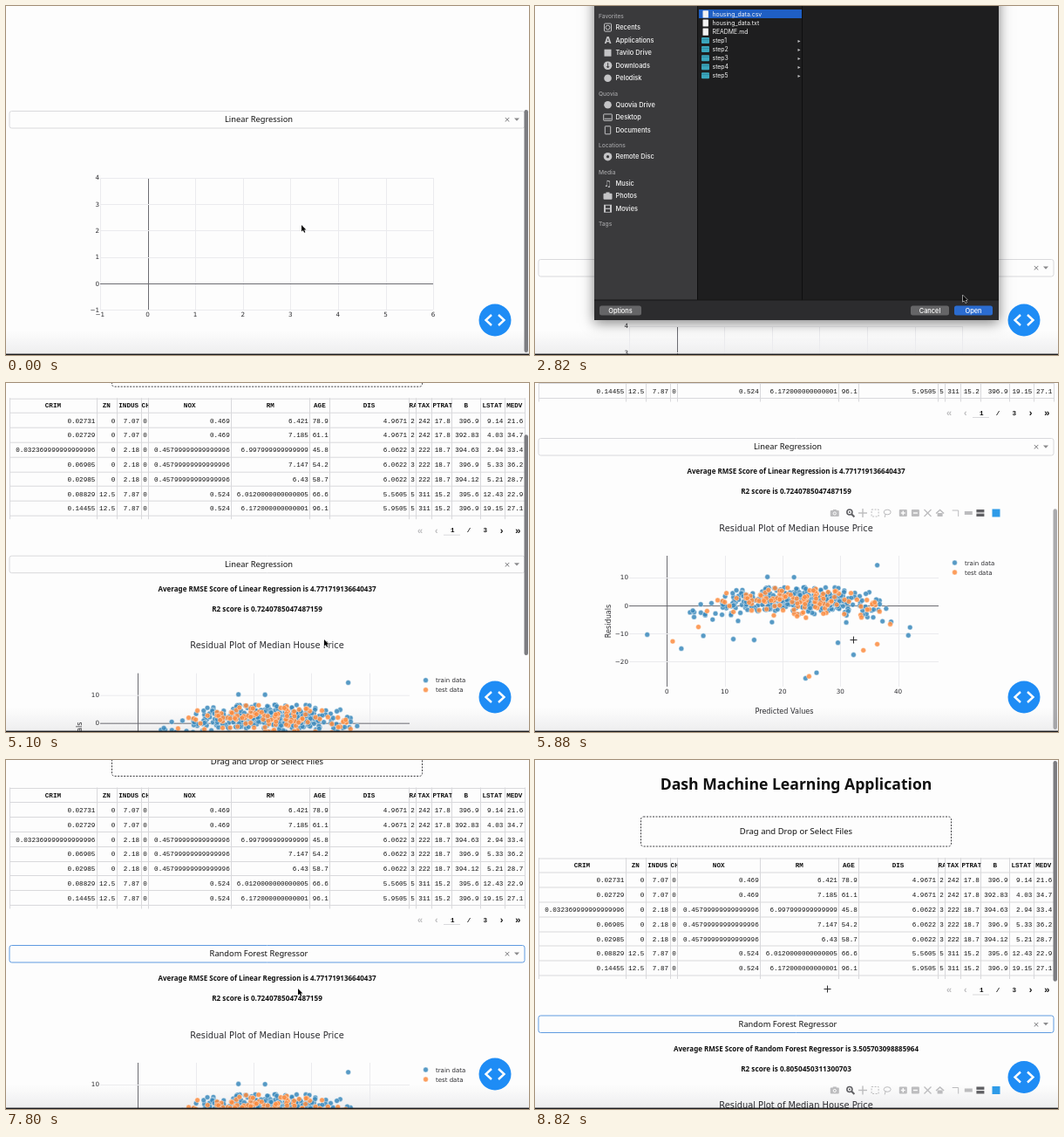
An HTML page with a canvas that plays this animation: 600x400 px, repeating every 8.88 s.

```html
<!DOCTYPE html>
<html lang="en">
<head>
<meta charset="utf-8">
<title>Machine learning dashboard</title>
<style>
html, body { margin: 0; width: 100%; height: 100%; overflow: hidden; background: #fdfdfd; }
canvas { display: block; }
</style>
</head>
<body>
<canvas id="stage" width="600" height="400"></canvas>
<script>
const ctx = document.getElementById('stage').getContext('2d');
const LOOP = 8880, STEP = 60;
const PAPER = '#fdfdfd', INK = '#101010', SOFT = '#2c2c30', RULE = '#d9d9dc', GREY = '#bcbcbe', DARK = '#606064';
const BLUE = '#1e8cf5', TRAIN = '#3a88bb', TEST = '#fb8c40';
const HAND = '"Comic Sans MS", "Noto Sans", sans-serif';
const CHART = '"DejaVu Sans", sans-serif';
const MONO = '"Liberation Mono", monospace';
const UI = 'Inter, sans-serif';

// Times of the events, in ms
const T = { sheetIn: 870, pick: 1740, open: 3240, hover: 3600, table: 4320, plot: 4440,
  menu: 7140, choose: 7680, result: 8040, leave: 8150 };

// Moves: start, end, then the value or point arrived at
const scrolls = [[0, 0, 170], [60, 720, 0], [4680, 5640, 227], [6420, 6960, 78], [7860, 8220, 227], [8400, 8810, -2.5]];
const pointer = [[0, 0, 339, 251], [60, 660, 306, 82], [900, 1080, 307, 115], [1140, 1700, 232, 8],
  [2300, 2900, 504, 348], [4380, 4680, 365, 294], [5940, 6420, 335, 222], [7140, 7500, 335, 262]];

const clamp = u => Math.max(0, Math.min(1, u));
const ease = (t, from, to) => { const u = clamp((t - from) / (to - from)); return u * u * (3 - 2 * u); };
const follow = (moves, t, i = 2) => moves.slice(1).reduce(
  (v, m) => t > m[0] ? v + (m[i] - v) * ease(t, m[0], m[1]) : v, moves[0][i]);

function text(s, x, y, font, color = INK, align = 'center') {
  ctx.font = font;
  ctx.fillStyle = color;
  ctx.textAlign = align;
  ctx.fillText(s, x, y + parseFloat(font.match(/[\d.]+px/)[0]) * 0.36);
}

function rect(x, y, w, h, color) {
  ctx.fillStyle = color;
  ctx.fillRect(x, y, w, h);
}

function paint(fill, stroke, width = 1) {
  if (fill) { ctx.fillStyle = fill; ctx.fill(); }
  if (stroke) { ctx.strokeStyle = stroke; ctx.lineWidth = width; ctx.stroke(); }
}

function box(x, y, w, h, r, fill, stroke) {
  ctx.beginPath();
  ctx.roundRect(x, y, w, h, r);
  paint(fill, stroke);
}

function disc(x, y, r, fill, stroke, width) {
  ctx.beginPath();
  ctx.arc(x, y, r, 0, 7);
  paint(fill, stroke, width);
}

function line(points, color, width) {
  ctx.beginPath();
  points.forEach(([x, y]) => ctx.lineTo(x, y));
  paint(null, color, width);
}

function dashedBox(x, y, w, h, r, color) {
  ctx.setLineDash([2, 1.5]);
  box(x, y, w, h, r, null, color);
  ctx.setLineDash([]);
}

// Data table; a column is as wide as its longest value, which may be on a later page
const heads = 'CRIM ZN INDUS CHAS NOX RM AGE DIS RAD TAX PTRATIO B LSTAT MEDV'.split(' ');
const laterValues = { INDUS: '18.1'.length + 1, DIS: '5.5605000000000002'.length };
const rows = `0.02731 0 7.07 0 0.469 6.421 78.9 4.9671 2 242 17.8 396.9 9.14 21.6
0.02729 0 7.07 0 0.469 7.185 61.1 4.9671 2 242 17.8 392.83 4.03 34.7
0.032369999999999996 0 2.18 0 0.45799999999999996 6.997999999999999 45.8 6.0622 3 222 18.7 394.63 2.94 33.4
0.06905 0 2.18 0 0.45799999999999996 7.147 54.2 6.0622 3 222 18.7 396.9 5.33 36.2
0.02985 0 2.18 0 0.45799999999999996 6.43 58.7 6.0622 3 222 18.7 394.12 5.21 28.7
0.08829 12.5 7.87 0 0.524 6.0120000000000005 66.6 5.5605 5 311 15.2 395.6 12.43 22.9
0.14455 12.5 7.87 0 0.524 6.172000000000001 96.1 5.9505 5 311 15.2 396.9 19.15 27.1`
  .split('\n').map(r => r.split(' '));
const edges = [4];
heads.forEach((h, c) => {
  const longest = Math.max(laterValues[h] || 0, ...rows.map(r => r[c].length));
  edges.push(edges[c] + 4.8 * longest + 3.8);
});

function cell(s, c, y, head) {
  const left = edges[c], right = edges[c + 1], font = `${head ? 'bold ' : ''}7.6px ${MONO}`;
  ctx.save();
  ctx.beginPath();
  ctx.rect(left, y - 9, right - left, 18);
  ctx.clip();
  ctx.font = font;
  if (!head) text(s, right - 1.5, y, font, INK, 'right');
  else if (ctx.measureText(s).width < right - left) text(s, (left + right) / 2, y, font);
  else text(s, left + 1, y, font, INK, 'left');
  ctx.restore();
}

function drawTable() {
  const pitch = 16.8, top = 109.5;
  for (let i = 0; i < 9; i++) rect(4, Math.round(top + i * pitch), 591, 1, RULE);
  edges.forEach(x => rect(Math.round(x), top, 1, 139, RULE));
  heads.forEach((h, c) => cell(h, c, 118, true));
  rows.forEach((r, i) => r.forEach((v, c) => cell(v, c, 135.2 + i * pitch)));
  [...'«‹1/3›»'].forEach((s, i) =>
    text(s, 475 + i * 18.7, 261, `bold ${/\w|\//.test(s) ? 7.6 : 11}px ${MONO}`, i < 2 ? GREY : INK));
  rect(502, 266, 19, 1, RULE);
}

// Charts: origin, pixels per unit, plot area, and ticks as first, step, last
const emptyPlot = { x0: 162.5, xs: 54.6, y0: 488, ys: 30.3, left: 108, right: 490, top: 367, bottom: 518,
  xTicks: [-1, 1, 6], yTicks: [-1, 1, 4] };
const residualPlot = { x0: 151.3, xs: 6.63, y0: 482, ys: 3.21, left: 108, right: 463, top: 425, bottom: 575,
  xTicks: [0, 10, 40], yTicks: [-20, 10, 10] };

function drawAxes(p) {
  const font = `7.2px ${CHART}`;
  const eachTick = ([first, step, last], draw) => {
    for (let v = first; v <= last; v += step) draw(v, String(v).replace('-', '−'), v ? '#ebebee' : '#6c6c72');
  };
  eachTick(p.xTicks, (v, label, color) => {
    const x = p.x0 + v * p.xs;
    rect(Math.round(x), p.top, 1, p.bottom - p.top, color);
    text(label, x, p.bottom + 5.5, font, SOFT);
  });
  eachTick(p.yTicks, (v, label, color) => {
    const y = p.y0 - v * p.ys;
    rect(p.left, Math.round(y), p.right - p.left, 1, color);
    text(label, p.left - 1, y, font, SOFT, 'right');
  });
}

// Residuals form an arch that drops off towards both ends
function makePoints(seed, drop, spread) {
  const random = () => (seed = seed * 16807 % 2147483647) / 2147483647;
  const gauss = () => Math.sqrt(-2 * Math.log(random())) * Math.cos(2 * Math.PI * random());
  return Array.from({ length: 440 }, (_, i) => {
    const x = Math.max(4, Math.min(43, 22.5 + gauss() * 7.6));
    const y = 1.8 - drop * ((x - 22) / 18) ** 4 + gauss() * spread;
    return [x, y > 6.5 ? 6.5 - random() * 5 : y, i >= 320];
  });
}
const outliers = [[-3.4, -10.4], [2.5, -15.4], [17.4, 10.2], [22, 10.1], [36.4, 14.4], [24, -26],
  [25.9, -24], [32.3, -17.6], [29.6, -13.3], [11.5, -12], [15.1, -12.3]];
const testOutliers = [[1, -12.8, true], [24.6, -25.3, true], [34, -16, true], [36.4, -13.8, true]];
const linearPoints = [...outliers, ...makePoints(4771, 7, 2.6), ...testOutliers];
const forestPoints = makePoints(3505, 2, 1.8);

function marker(x, y, test) {
  ctx.globalAlpha = 0.85;
  disc(x, y, 2.9, test ? TEST : TRAIN, '#ffffff', 0.5);
  ctx.globalAlpha = 1;
}

function drawResiduals(points) {
  const p = residualPlot;
  text('Residual Plot of Median House Price', 299.5, 393, `9.9px ${CHART}`, SOFT);
  drawAxes(p);
  points.forEach(([x, y, test]) => marker(p.x0 + x * p.xs, p.y0 - y * p.ys, test));
  ['train data', 'test data'].forEach((s, i) => {
    marker(481.5, 433 + i * 11, i);
    text(s, 493, 433 + i * 11, `7px ${CHART}`, SOFT, 'left');
  });
  text('Predicted Values', 286, 603, `8.1px ${CHART}`, SOFT);
  ctx.save();
  ctx.translate(84, 500);
  ctx.rotate(-Math.PI / 2);
  text('Residuals', 0, 0, `8.1px ${CHART}`, SOFT);
  ctx.restore();
}

// Chart tools, each drawn around its own centre
const icons = {
  camera() { box(-5, -3, 10, 7, 1, GREY); rect(-2, -4, 4, 2, GREY); disc(0, 0.5, 1.6, GREY, PAPER); },
  zoom() { line([[1, 1], [4.5, 4.5]], DARK, 2); disc(-1, -1, 3, null, DARK, 1.6); disc(-1, -1, 1, DARK); },
  pan() { rect(-5, -0.7, 10, 1.4, GREY); rect(-0.7, -5, 1.4, 10, GREY); },
  select() { dashedBox(-4, -4, 8, 8, 0, GREY); },
  lasso() { ctx.beginPath(); ctx.ellipse(0, -1, 4, 2.8, 0, 0, 7); paint(null, GREY); line([[-2, 1], [-3, 5]], GREY); },
  minus() { box(-4.5, -4, 9, 8, 1, GREY); rect(-2.5, -0.7, 5, 1.4, PAPER); },
  plus() { icons.minus(); rect(-0.7, -2.5, 1.4, 5, PAPER); },
  fit() { [-4, 4].forEach(s => line([[-4, -s], [4, s]], GREY, 1.3)); },
  home() { rect(-3, 0, 6, 4, GREY); line([[-4.5, 0.5], [0, -3.5], [4.5, 0.5]], GREY, 1.6); },
  spike() { line([[-4, -3], [3, -3], [3, 4]], GREY); },
  tag() { rect(-4, -2, 9, 4, GREY); },
  tags() { [-4, 0.6].forEach(y => rect(-4.5, y, 9, 3.4, DARK)); },
  logo() { rect(-4.5, -4.5, 9, 9, '#2e9be8'); }
};
const shortBar = 'camera | zoom pan | plus minus fit home | logo';
const fullBar = 'camera | zoom pan select lasso | plus minus fit home | spike tag tags | logo';

function drawBar(names, y) {
  let x = 529;
  names.split(' ').reverse().forEach(name => {
    if (name === '|') { x -= 4; return; }
    ctx.save();
    ctx.translate(x, y);
    icons[name]();
    ctx.restore();
    x -= 14.1;
  });
}

// Page parts
const models = ['Linear Regression', 'Random Forest Regressor'];

function drawDropdown(t, cursorY) {
  box(4, 290.5, 591, 19.5, 2.5, PAPER, t >= T.menu ? '#5f9be0' : RULE);
  text(models[t >= T.choose ? 1 : 0], 290, 300, `9.3px ${HAND}`);
  text('×', 575, 300, `9px ${CHART}`, '#77777a');
  ctx.beginPath();
  [[583, 298.5], [589, 298.5], [586, 301.8]].forEach(p => ctx.lineTo(...p));
  paint('#8a8a8c');
  if (t < T.menu || t >= T.choose) return;
  box(4, 310, 591, 40, 1, PAPER, RULE);
  models.forEach((s, i) => {
    if (i === (cursorY > 330 ? 1 : 0)) rect(5, 311 + i * 19.5, 589, 19, '#e8f2fc');
    text(s, 290, 320.5 + i * 19.5, `9.3px ${HAND}`);
  });
}

function drawPage(t, scroll, cursorY, overPlot) {
  const done = t >= T.result ? 1 : 0;
  ctx.save();
  ctx.translate(0, -scroll);
  text('Dash Machine Learning Application', 299.5, 25, `bold 17.6px ${HAND}`);
  dashedBox(121.5, 62.5, 356, 34, 3, '#3c3c40');
  text('Drag and Drop or Select Files', 299.5, 79.5, `9.5px ${HAND}`);
  if (t >= T.table) drawTable();
  if (t < T.plot) {
    drawAxes(emptyPlot);
    if (t >= T.hover) drawBar(shortBar, 317.5);
  } else {
    const rmse = ['4.771719136640437', '3.505703098885964'][done];
    const r2 = ['0.7240785047487159', '0.8050450311300703'][done];
    text(`Average RMSE Score of ${models[done]} is ${rmse}`, 299.5, 328.5, `bold 8px ${HAND}`);
    text(`R2 score is ${r2}`, 299.5, 351.5, `bold 8.2px ${HAND}`);
    drawResiduals(done ? forestPoints : linearPoints);
    if (overPlot) drawBar(fullBar, 376);
  }
  drawDropdown(t, cursorY + scroll);
  ctx.restore();
}

function drawBackground() {
  const shade = ctx.createLinearGradient(0, 372, 0, 400);
  shade.addColorStop(0, PAPER);
  shade.addColorStop(1, '#ededee');
  rect(0, 0, 600, 400, PAPER);
  rect(0, 372, 600, 28, shade);
}

function drawOverlay(t, scroll) {
  const y = 360 - Math.min(0, scroll) * 1.4;
  disc(561, y, 18.5, BLUE);
  [-1, 1].forEach(s => line([[561 + s * 4, y - 6], [561 + s * 10.5, y], [561 + s * 4, y + 6]], '#ffffff', 2.4));
  // The scroll bar fades after each move
  const idle = t - Math.max(...scrolls.filter(m => t >= m[0]).map(m => m[1]));
  const range = t < T.plot ? 170 : 227, length = 396 * 400 / (400 + range);
  ctx.globalAlpha = 1 - clamp((idle - 150) / 250);
  box(594.5, 1 + clamp(scroll / range) * (396 - length), 4.5, length, 2.2, '#7c7c80');
  ctx.globalAlpha = 1;
  rect(0, 398.6, 600, 1.4, '#1a1a1c');
}

// File chooser: headings with their entries and icons
const places = [
  ['Favorites', 'Recents:clock', 'Applications:A', 'Tavilo Drive:square', 'Downloads:↓', 'Pelodisk:disc'],
  ['Quovia', 'Quovia Drive:disc', 'Desktop:screen', 'Documents:page'],
  ['Locations', 'Remote Disc:ring'],
  ['Media', 'Music:♫', 'Photos:photo', 'Movies:film'],
  ['Tags']];
const files = ['housing_data.csv', 'housing_data.txt', 'README.md', 'step1', 'step2', 'step3', 'step4', 'step5'];
const PALE = '#c4c4c6', SIDE = '#3a3a3c';

const placeIcons = {
  square() { rect(-4, -4, 8, 8, PALE); },
  disc() { disc(0, 0, 4.3, PALE); },
  ring() { disc(0, 0, 4.8, PALE); disc(0, 0, 1.6, SIDE); },
  '↓'() { disc(0, 0, 4.8, PALE); text('↓', 0, 0, `bold 8px ${CHART}`, SIDE); },
  page() { box(-3.2, -4.5, 6.4, 9, 0.5, null, PALE); },
  screen() { box(-4.8, -3.8, 9.6, 7.4, 0.5, null, PALE); rect(-4, 1, 8, 1, PALE); },
  photo() { box(-5, -3, 10, 7, 1, PALE); rect(-2, -4.2, 4, 2, PALE); },
  film() { rect(-4.5, -4.5, 9, 9, PALE); [-3.5, 0.7].forEach(y => rect(-2.5, y, 5, 3, SIDE)); },
  clock() { box(-4, -4.5, 8, 9, 1, null, PALE); disc(0, 0, 2.4, null, PALE); }
};

function drawPlaces() {
  let y = 12;
  places.forEach(([heading, ...entries]) => {
    text(heading, 73, y, `500 6.6px ${UI}`, '#a2a2a4', 'left');
    y += 12.6;
    entries.forEach(entry => {
      const [label, icon] = entry.split(':');
      ctx.save();
      ctx.translate(83.5, y);
      if (placeIcons[icon]) placeIcons[icon]();
      else text(icon, 0, 0, `bold 10px ${CHART}`, PALE);
      ctx.restore();
      text(label, 92.5, y, `500 7.4px ${UI}`, '#f6f6f6', 'left');
      y += 14.55;
    });
    y += 3.25;
  });
}

function drawFile(name, y) {
  if (name.includes('.')) {
    box(192.5, y - 4, 6.4, 8.2, 0.5, '#f2f2f2');
  } else {
    box(191, y - 3.5, 9, 7, 1, '#3ba6bc');
    rect(191, y - 1.6, 9, 0.7, '#27809a');
    text('▸', 303, y, `6px ${CHART}`, PALE);
  }
  text(name, 203.5, y, `6.9px ${UI}`, '#f6f6f6', 'left');
}

function button(s, x, w, fill, color = '#ffffff') {
  box(x, 343.5, w, 11, 2.5, fill);
  text(s, x + w / 2, 349, `500 7.4px ${UI}`, color);
}

function drawChooser(t) {
  const shown = ease(t, T.sheetIn, T.sheetIn + 210) - ease(t, T.open, T.open + 300);
  if (shown <= 0) return;
  const picked = t >= T.pick;
  ctx.save();
  ctx.translate(0, (shown - 1) * 375);
  ctx.shadowColor = 'rgba(0,0,0,.5)';
  ctx.shadowBlur = 14;
  ctx.shadowOffsetY = 3;
  rect(68, -40, 464, 400, '#2c2c2e');
  ctx.shadowColor = 'transparent';
  rect(68, -40, 119, 377, SIDE);
  rect(187, -40, 345, 377, '#1e1e1f');
  [186, 306].forEach(x => rect(x, -40, 1, 377, '#0e0e0f'));
  rect(68, 336.5, 464, 1, '#161617');
  drawPlaces();
  if (picked) rect(188, 4, 118, 10, '#1f5fc4');
  files.forEach((name, i) => drawFile(name, 9.3 + i * 10.08));
  button('Options', 74, 48, '#656567');
  button('Cancel', 431, 44, '#656567');
  if (picked) button('Open', 481, 44, '#2b6cd0');
  else button('Open', 481, 44, '#3b3b3d', '#707072');
  ctx.restore();
}

function drawCursor(x, y, cross) {
  if (cross) {
    rect(x - 3.5, y, 8, 1, '#2c2c2e');
    rect(x, y - 3.5, 1, 8, '#2c2c2e');
    return;
  }
  ctx.beginPath();
  [[0, 0], [0, 7.6], [1.8, 6], [3.1, 8.8], [4.4, 8.2], [3.1, 5.5], [5.4, 5.4]].forEach(([a, b]) => ctx.lineTo(x + a, y + b));
  ctx.closePath();
  paint(null, '#ffffff');
  paint('#080808');
}

function draw(t) {
  const scroll = follow(scrolls, t), x = follow(pointer, t), y = follow(pointer, t, 3);
  // The pointer keeps its cross while the page scrolls away under it
  const overPlot = t >= T.plot && (t > T.leave || y + scroll > residualPlot.top);
  drawBackground();
  drawPage(t, scroll, y, overPlot);
  drawOverlay(t, scroll);
  drawChooser(t);
  drawCursor(x, y, overPlot);
}

const start = performance.now();
function tick() {
  const t = (performance.now() - start) % LOOP;
  draw(Math.floor(t / STEP) * STEP);
  requestAnimationFrame(tick);
}
tick();
</script>
</body>
</html>
```
